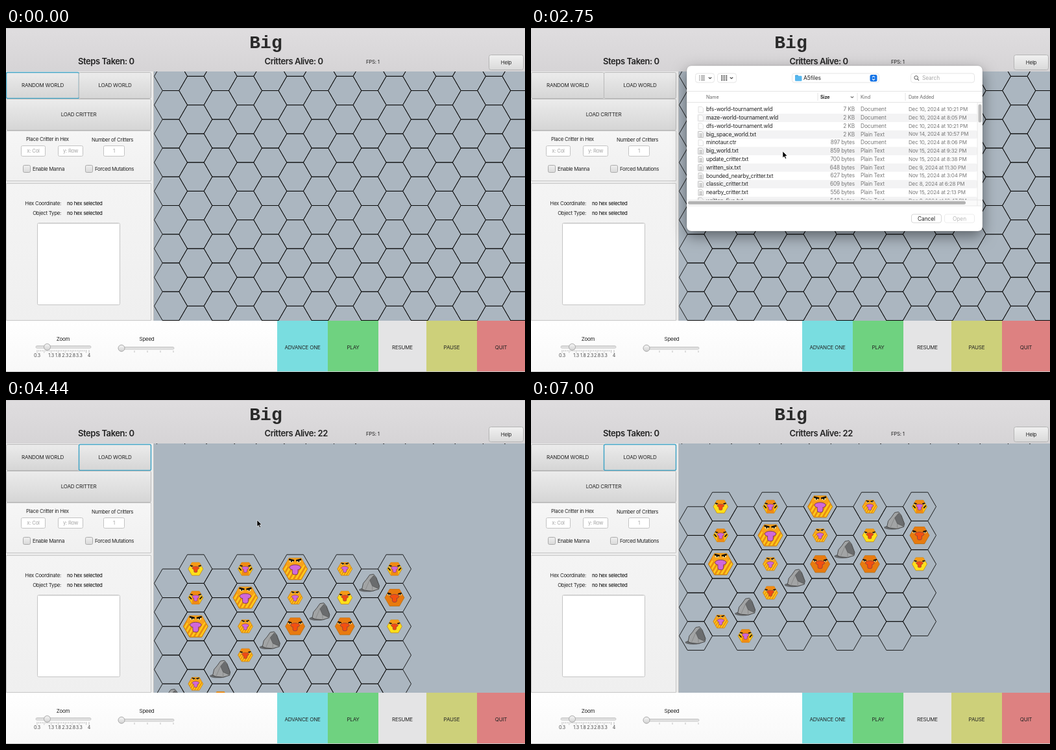
An HTML page with a canvas for the animation above (7060 ms loop, 800 by 530 pixels).

```html
<!DOCTYPE html>
<html lang="en">
<head>
<meta charset="utf-8">
<title>Critter world</title>
<style>
  html, body { margin: 0; height: 100%; overflow: hidden; }
  canvas { display: block; }
</style>
</head>
<body>
<canvas id="stage" width="800" height="530"></canvas>
<script>
const g = document.getElementById('stage').getContext('2d');
const LOOP = 7060, R = 25.55, ROW = 44.25;
const PRESS = 1440, RELEASE = 1690, OPEN = 2000, CLOSE = 3130, LOADED = 3500, DROP = 5300;

// Cursor path: time, x, y of the tip
const PATH = [
  [0, 330, -16], [500, 330, -16], [1250, 164, 84], [1750, 164, 84], [2650, 388, 190],
  [4300, 388, 190], [4440, 387, 185], [5250, 387, 89], [5500, 387, 89],
  [5880, 512, 71], [6000, 522, 37], [6120, 530, -16], [LOOP, 530, -16]
];

const KINDS = {
  young: { base: '#ffe01a', top: '#f59a16', face: '#f04a12' },
  spiny: { base: '#ffc70f', top: '#f08a14', face: '#d066d8' },
  tiger: { base: '#ffc81c', top: '#f9a21a', face: '#d068da', stripe: '#e98c10' },
  ember: { base: '#ffc81c', top: '#f08a14', face: '#f04a12', stripe: '#e98c10' },
  plain: { base: '#e87a0e', top: '#e87a0e', face: '#f4500f' }
};
const S = 11.5, M = 15, L = 19;
const CRITTERS = [
  [1, 0, 'young', S], [1, 1, 'spiny', S], [1, 2, 'tiger', L], [1, 4, 'tiger', S],
  [2, 4, 'spiny', S],
  [3, 0, 'spiny', S], [3, 1, 'tiger', L], [3, 2, 'tiger', S], [3, 3, 'ember', S],
  [5, 0, 'tiger', L], [5, 1, 'tiger', S], [5, 2, 'plain', M],
  [7, 0, 'tiger', S], [7, 1, 'young', S], [7, 2, 'plain', M],
  [9, 0, 'spiny', S], [9, 1, 'plain', M], [9, 2, 'young', S]
];

const FILES = [
  ['bfs-world-tournament.wld', '7 KB', 'Dec 10, 2024 at 10:21 PM'],
  ['maze-world-tournament.wld', '2 KB', 'Dec 10, 2024 at 8:05 PM'],
  ['dfs-world-tournament.wld', '2 KB', 'Dec 10, 2024 at 10:21 PM'],
  ['big_space_world.txt', '2 KB', 'Nov 14, 2024 at 10:57 PM'],
  ['minotaur.ctr', '897 bytes', 'Dec 10, 2024 at 8:06 PM'],
  ['big_world.txt', '859 bytes', 'Nov 15, 2024 at 9:32 PM'],
  ['update_critter.txt', '700 bytes', 'Nov 15, 2024 at 8:38 PM'],
  ['written_six.txt', '648 bytes', 'Dec 9, 2024 at 11:30 PM'],
  ['bounded_nearby_critter.txt', '627 bytes', 'Nov 15, 2024 at 3:04 PM'],
  ['classic_critter.txt', '609 bytes', 'Dec 8, 2024 at 6:28 PM'],
  ['nearby_critter.txt', '556 bytes', 'Nov 15, 2024 at 2:13 PM'],
  ['written_five.txt', '548 bytes', 'Dec 9, 2024 at 10:47 PM']
];

function text(s, x, y, { size = 7.8, align = 'left', color = '#222', weight = 400, gap = -0.25 } = {}) {
  g.font = `${weight} ${size}px Inter, "Liberation Sans", sans-serif`;
  g.letterSpacing = gap + 'px';
  g.textAlign = align;
  g.textBaseline = 'middle';
  g.fillStyle = color;
  g.fillText(s, x, y);
}

function shade(y, h, from, to) {
  const s = g.createLinearGradient(0, y, 0, y + h);
  s.addColorStop(0, from);
  s.addColorStop(1, to);
  return s;
}

function box(x, y, w, h, fill, stroke, r = 0, line = 1) {
  g.beginPath();
  g.roundRect(x, y, w, h, r);
  if (fill) { g.fillStyle = fill; g.fill(); }
  if (stroke) { g.strokeStyle = stroke; g.lineWidth = line; g.stroke(); }
}

function poly(points, fill, stroke, line = 1) {
  g.beginPath();
  points.forEach(([x, y]) => g.lineTo(x, y));
  g.closePath();
  if (fill) { g.fillStyle = fill; g.fill(); }
  if (stroke) { g.strokeStyle = stroke; g.lineWidth = line; g.stroke(); }
}

function lines(color, width, ...paths) {
  g.strokeStyle = color;
  g.lineWidth = width;
  g.beginPath();
  for (const p of paths) {
    g.moveTo(p[0], p[1]);
    for (let i = 2; i < p.length; i += 2) g.lineTo(p[i], p[i + 1]);
  }
  g.stroke();
}

function oval(x, y, rx, ry, fill, stroke, line = 1) {
  g.beginPath();
  g.ellipse(x, y, rx, ry, 0, 0, 7);
  if (fill) { g.fillStyle = fill; g.fill(); }
  if (stroke) { g.strokeStyle = stroke; g.lineWidth = line; g.stroke(); }
}

const hexPoints = (x, y, r) => [0, 1, 2, 3, 4, 5].map(i =>
  [x + r * Math.cos(i * Math.PI / 3), y + r * Math.sin(i * Math.PI / 3)]);

const hexCenter = (c, r, top) => [254 + 1.5 * R * c, top + ROW * r + (c % 2 ? 0 : ROW / 2)];

function grid(cols, rows, top) {
  for (let c = 0; c < cols; c++)
    for (let r = 0; r < rows; r++) poly(hexPoints(...hexCenter(c, r, top), R), null, '#0a0a0a', 0.9);
}

function critter(x, y, kind, r) {
  const k = KINDS[kind];
  g.save();
  g.translate(x, y);
  g.scale(r, r);
  poly(hexPoints(0, 0, 1), k.base, '#b06a08', 0.05);
  g.clip();
  if (k.stripe)
    for (let i = -2; i < 2; i += 0.34) lines(k.stripe, 0.14, [i - 0.6, 1, i + 0.6, -1]);
  poly([[-0.6, -1], [0.6, -1], [0.72, -0.3], [0.3, -0.05], [-0.3, -0.05], [-0.72, -0.3]], k.top);
  if (kind === 'spiny') {
    poly([[-0.45, -0.1], [0.45, -0.1], [0.5, 1], [-0.5, 1]], '#f08a14');
    lines('#22160c', 0.16, [-0.85, -0.15, -0.55, 0.2], [0.85, -0.15, 0.55, 0.2]);
  }
  const ey = kind === 'tiger' ? -0.72 : -0.42, ex = kind === 'tiger' ? 0.3 : 0.58;
  for (const s of [-1, 1]) {
    oval(s * ex, ey + 0.1, 0.15, 0.1, '#ffe9a0');
    lines('#15100a', 0.14, [s * (ex - 0.22), ey + 0.05, s * (ex + 0.2), ey - 0.06]);
    oval(s * ex, ey + 0.1, 0.06, 0.07, '#15100a');
  }
  box(-0.23, -0.1, 0.46, 0.56, k.face, '#7a3a50', 0.16, 0.05);
  oval(0, -0.12, 0.46, 0.22, k.face, '#7a3a50', 0.05);
  box(-0.2, -0.12, 0.4, 0.3, k.face);
  g.restore();
}

function rock(x, y) {
  g.save();
  g.translate(x, y);
  oval(-4, 10, 12.5, 3.2, '#66696c');
  poly([[-12, 9], [-10, 0], [-5, -6], [0, -13], [6, -14], [10, -9], [15, 4], [14, 9], [4, 12], [-7, 11]],
    '#a2a4a5', '#333', 0.8);
  poly([[0, -5], [6, -12], [10, -8], [14.5, 4], [13, 8], [4, 4]], '#6a6c6e', '#444', 0.5);
  lines('#777', 0.6, [0, -5, -4, 4, -7, 11], [4, 4, 4, 12]);
  g.restore();
}

function world(t, cursorY) {
  g.save();
  g.beginPath();
  g.rect(228, 67, 572, 384);
  g.clip();
  g.fillStyle = '#abb6c0';
  g.fillRect(228, 67, 572, 384);
  if (t < LOADED) grid(16, 10, 52.25);
  else {
    const top = 164.3 + (t < DROP ? cursorY - 89 : 0);
    grid(10, 5, top);
    for (let i = 0; i < 5; i++) rock(...hexCenter(2 * i, 4 - i, top));
    for (const [c, r, kind, size] of CRITTERS) critter(...hexCenter(c, r, top), kind, size);
    // A sliver of the old grid stays under the header
    g.beginPath();
    g.rect(228, 67, 572, 1);
    g.clip();
    grid(16, 2, 52.25);
  }
  g.restore();
}

function button(label, x, y, w, h, { focus, pressed } = {}) {
  const fill = pressed ? shade(y, h, '#cbcbcb', '#b6b6b6') : shade(y, h, '#ececec', '#d5d5d5');
  box(x + 0.5, y + 0.5, w - 1, h - 1, fill, focus ? '#41a5c6' : '#b9b9b9', 2, focus ? 1.5 : 1);
  text(label, x + w / 2, y + h / 2 + 0.5, { size: 8, align: 'center', gap: -0.2 });
}

function field(label, x, w) {
  box(x + 0.5, 181.5, w - 1, 16, '#fff', '#c3c3c3', 2);
  text(label, x + w / 2, 190, { align: 'center', color: '#a3a3a3' });
}

function check(label, x) {
  box(x + 0.5, 211.5, 11, 11, shade(211, 12, '#f0f0f0', '#d8d8d8'), '#aaa', 2);
  text(label, x + 15, 217.5);
}

function slider(label, cx, x, y, thumb) {
  text(label, cx, 479.5, { align: 'center', size: 8 });
  box(x, y - 1.8, 85, 3.6, shade(y - 2, 4, '#d2d2d2', '#f0f0f0'), '#bdbdbd', 2, 0.8);
  oval(thumb, y, 5, 5, shade(y - 5, 10, '#f6f6f6', '#d2d2d2'), '#a0a0a0', 0.9);
}

function header(t) {
  g.fillStyle = shade(0, 67, '#dfdddf', '#d6d4d6');
  g.fillRect(0, 0, 800, 67);
  g.fillStyle = '#cbc9cb';
  g.fillRect(0, 0, 800, 1);
  g.letterSpacing = '0px';
  g.font = 'bold 28px "Liberation Mono", monospace';
  g.textAlign = 'center';
  g.textBaseline = 'alphabetic';
  g.fillStyle = '#2a2a2a';
  g.fillText('Big', 400.5, 31);
  const big = { size: 13, weight: 600, gap: -0.45 };
  text('Steps Taken: 0', 111, 52.5, big);
  text('Critters Alive: ' + (t < LOADED ? 0 : 22), 398.5, 52.5, big);
  text('FPS: 1', 555, 52.5);
  box(744.5, 41.5, 53, 23, shade(41, 24, '#f1f1f1', '#d9d9d9'), '#b4b4b4', 3);
  text('Help', 771, 53.5, { size: 8, align: 'center' });
}

function sidebar(t) {
  g.fillStyle = '#ececec';
  g.fillRect(0, 67, 228, 384);
  box(0.5, 158.5, 223, 77, shade(158, 78, '#f6f6f6', '#f0f0f0'), '#c6c6c6');
  box(0.5, 239.5, 223, 211, shade(239, 212, '#f4f4f4', '#efefef'), '#c6c6c6');
  lines('#c2c2c2', 1, [227.5, 67, 227.5, 451]);

  const focusLoad = (t >= PRESS && t < OPEN) || t >= LOADED;
  button('RANDOM WORLD', 0, 68, 113, 41, { focus: t < PRESS });
  button('LOAD WORLD', 112, 68, 112, 41, { focus: focusLoad, pressed: t >= PRESS && t < RELEASE });
  button('LOAD CRITTER', 0, 109, 224, 49);

  text('Place Critter in Hex', 31, 171.5);
  text('Number of Critters', 132, 172.5);
  field('x: Col', 23, 38);
  field('y: Row', 80, 39);
  field('1', 150, 33);
  check('Enable Manna', 26);
  check('Forced Mutations', 122);

  text('Hex Coordinate:', 85, 271, { align: 'right' });
  text('Object Type:', 85, 286, { align: 'right' });
  for (const y of [271, 286]) text('no hex selected', 94, y, { color: '#000' });
  box(48.5, 300.5, 127, 126, '#fff', '#c4c4c4', 2);
  lines('#e6e6e6', 1, [49, 301.5, 175, 301.5]);
}

function footer() {
  g.fillStyle = shade(451, 79, '#ffffff', '#f8f8f8');
  g.fillRect(0, 451, 418, 79);
  slider('Zoom', 88, 46, 491.5, 63.5);
  for (let i = 0; i <= 28; i++) {
    const x = 48 + i * 2.7;
    lines('#999', 0.6, [x, 496, x, i % 4 ? 498.5 : 500.5]);
  }
  lines('#999', 0.6, [128, 496, 128, 500.5]);
  for (const v of [0.3, 1.3, 1.8, 2.3, 2.8, 3.3, 4])
    text(v, 48 + (v - 0.3) * 21.6, 504.5, { size: 7, align: 'center', color: '#444', gap: -0.1 });
  slider('Speed', 217, 174, 493.3, 178);
  for (let x = 198; x < 260; x += 20) lines('#aaa', 0.7, [x, 497, x, 500]);

  [['ADVANCE ONE', 418, 496, '#79dde0'], ['PLAY', 496, 574, '#6fd280'], ['RESUME', 574, 648, '#e4e4e5'],
   ['PAUSE', 648, 726, '#cdd07a'], ['QUIT', 726, 800, '#dd8181']].forEach(([label, a, b, color]) => {
    g.fillStyle = color;
    g.fillRect(a, 451, b - a, 79);
    text(label, (a + b) / 2, 493, { size: 8, align: 'center', gap: -0.2 });
  });
  g.fillStyle = '#c4c4c4';
  g.fillRect(0, 529, 800, 1);
}

const chevron = (x, y, color = '#444', d = 1) => lines(color, 1.1, [x - 2.2, y - d, x, y + d, x + 2.2, y - d]);

function fileRow([name, size, date], i) {
  const y = 125.7 + i * 12.78, txt = name.endsWith('.txt'), gray = '#777';
  if (i % 2) box(256, y - 6.4, 432, 12.8, '#f3f3f4', null, 3);
  poly([[258, y - 4.5], [263, y - 4.5], [265.5, y - 2], [265.5, y + 4.5], [258, y + 4.5]],
    '#fcfcfc', txt ? '#aaa' : '#d5d5d5', 0.7);
  if (txt) lines('#8c8c8c', 0.8, [259.5, y - 1, 264, y - 1], [259.5, y + 1, 264, y + 1], [259.5, y + 3, 264, y + 3]);
  text(name, 270, y, { size: 8.5, gap: -0.15 });
  text(size, 499, y, { size: 8.3, gap: -0.15, align: 'right', color: gray });
  text(txt ? 'Plain Text' : 'Document', 508, y, { size: 8.4, gap: -0.15, color: gray });
  text(date, 582, y, { size: 8, gap: -0.15, color: gray });
}

function dialog() {
  g.save();
  g.shadowColor = 'rgba(0,0,0,.45)';
  g.shadowBlur = 22;
  g.shadowOffsetY = 8;
  box(240, 58, 456, 255, '#fff', null, 7);
  g.restore();
  box(240, 58, 456, 255, null, 'rgba(0,0,0,.2)', 7, 0.6);

  for (const [x, w] of [[253.5, 29], [287.5, 29], [402.5, 134], [585.5, 98]]) box(x, 70, w, 14, '#fff', '#e3e3e3', 3.5, 0.9);
  for (const y of [74, 77, 80]) {
    lines('#555', 1, [259, y, 260.5, y], [262, y, 268, y]);
    for (const x of [293, 296.5, 300]) box(x, y - 1, 2.4, 2, '#666');
  }
  chevron(276, 77);
  chevron(309, 77);
  box(407, 72.5, 5, 4, '#3f9fd8', null, 1);
  box(407, 73.7, 10.5, 8, '#56b7ee', null, 1.2);
  text('A5files', 420, 77.5, { size: 8.5, gap: -0.1 });
  box(522.5, 72, 11, 10.5, '#1473e6', null, 2.5);
  chevron(528, 75.2, '#fff', -1);
  chevron(528, 79.2, '#fff');
  oval(593.7, 76.5, 2.8, 2.8, null, '#555', 1);
  lines('#555', 1.1, [595.8, 78.6, 598, 81]);
  text('Search', 603, 77.5, { size: 8.3, color: '#aaa', gap: -0.1 });

  lines('#dedede', 0.8, [240, 97.5, 696, 97.5], [240, 114.5, 696, 114.5],
    [442, 100, 442, 112], [503, 100, 503, 112], [577, 100, 577, 112]);
  const head = { size: 7.2, color: '#666', gap: -0.1 };
  text('Name', 270, 106.5, head);
  text('Size', 446, 106.5, { ...head, color: '#222', weight: 700 });
  chevron(495, 106.5, '#777');
  text('Kind', 508, 106.5, head);
  text('Date Added', 582, 106.5, head);

  g.save();
  g.beginPath();
  g.rect(240, 115, 449, 150);
  g.clip();
  FILES.forEach(fileRow);
  g.restore();

  box(240, 265, 456, 9, '#fafafa');
  box(688, 115, 8, 150, '#fafafa');
  lines('#e4e4e4', 0.8, [240, 265, 696, 265], [688, 115, 688, 274], [240, 274, 696, 274]);
  box(689.5, 117.5, 5, 28, '#bdbdbd', null, 2.5);
  box(242, 266.8, 428, 5, '#b2b2b2', null, 2.5);
  box(586.5, 287, 46, 13, '#fff', '#d2d2d2', 3, 0.9);
  box(637.5, 287, 46, 13, '#fff', '#ebebeb', 3, 0.9);
  text('Cancel', 609.5, 294, { size: 8.4, align: 'center', gap: -0.1 });
  text('Open', 660.5, 294, { size: 8.4, align: 'center', color: '#b8b8b8', gap: -0.1 });
}

function cursorAt(t) {
  const i = PATH.findIndex(p => p[0] > t), [t0, x0, y0] = PATH[i - 1], [t1, x1, y1] = PATH[i];
  const p = (t - t0) / (t1 - t0), e = p * p * (3 - 2 * p);
  return [x0 + (x1 - x0) * e, y0 + (y1 - y0) * e];
}

function arrow([x, y]) {
  poly([[0, 0], [0, 10], [2.3, 8], [4, 11.6], [5.6, 10.9], [4, 7.3], [7, 7]].map(([a, b]) => [x + a, y + b]),
    '#000', '#fff', 0.6);
}

function draw(now) {
  const t = now % LOOP, tip = cursorAt(t);
  world(t, tip[1]);
  header(t);
  sidebar(t);
  footer();
  if (t >= OPEN && t < CLOSE) dialog();
  arrow(tip);
  requestAnimationFrame(draw);
}
requestAnimationFrame(draw);
</script>
</body>
</html>
```
